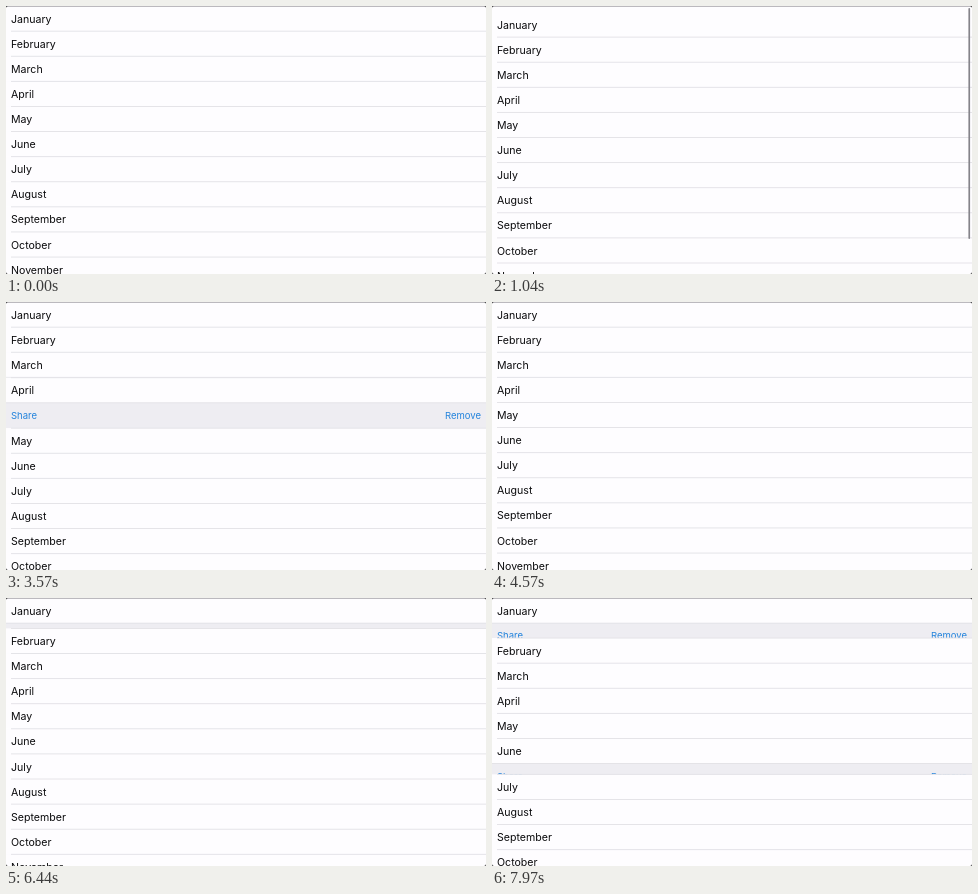
These frames come from a looping animation (480 px wide and 268 px high, 8 s). An HTML page:

```html
<!DOCTYPE html>
<html lang="en">
<head>
<meta charset="utf-8">
<title>Expandable list</title>
<style>
  html, body { margin: 0; width: 100%; height: 100%; overflow: hidden; background: #fefdff; }
  svg { display: block; width: 480px; height: 268px; }
  text { font: 10.6px Inter, sans-serif; fill: #0b0b0d; }
  .action { font-size: 9.5px; fill: #2383dc; }
  .end { text-anchor: end; }
  .paper { fill: #fefdff; }
  .drawer { fill: #eeedf2; }
  .line { fill: #e2e1e6; }
</style>
</head>
<body>
<svg id="stage" viewBox="0 0 480 268">
  <g id="list"></g>
  <rect id="bar" x="476.4" y="2" width="1.7" rx="0.85" fill="#85848a"/>
  <rect width="480" height="0.8" fill="#aaa9ae"/>
  <path d="M0 0H2Q0 0 0 2ZM480 0H478Q480 0 480 2ZM0 268V266Q0 268 2 268ZM480 268V266Q480 268 478 268Z" fill="#222"/>
</svg>
<script>
const LOOP = 8000, PITCH = 25.1, DRAWER = 25.7, MOVE = 300;
const months = ['January', 'February', 'March', 'April', 'May', 'June', 'July',
  'August', 'September', 'October', 'November', 'December'];

// [start time, row index, open or close]
const moves = [
  [1995, 1, 1],
  [2745, 1, 0], [2745, 3, 1],
  [3545, 3, 0], [3545, 2, 1],
  [4255, 2, 0],
  [4940, 2, 1], [5460, 2, 0],
  [6347, 0, 1],
  [6945, 0, 0], [6945, 5, 1],
  [7807, 5, 0], [7807, 0, 1],
];

const clamp = x => Math.max(0, Math.min(1, x));

// cubic-bezier(.42, 0, .58, 1), solved by bisection
function easeInOut(x) {
  let lo = 0, hi = 1;
  for (let i = 0; i < 20; i++) {
    const s = (lo + hi) / 2, r = 1 - s;
    if (3 * r * r * s * 0.42 + 3 * r * s * s * 0.58 + s ** 3 < x) lo = s; else hi = s;
  }
  return lo * lo * (3 - 2 * lo);
}

function openness(row, t) {
  let value = 0;
  for (const [start, index, target] of moves) {
    if (index === row && t > start) {
      value += (target - value) * easeInOut(clamp((t - start) / MOVE));
    }
  }
  return value;
}

// Pull down, then a critically damped return
function overscroll(t) {
  if (t < 470 || t > 1500) return 0;
  if (t < 880) return 19.5 * (1 - Math.cos(Math.PI * (t - 470) / 410)) / 2;
  const k = (t - 880) * 0.015;
  return 19.5 * (1 + k) * Math.exp(-k);
}

const list = document.getElementById('list');
const bar = document.getElementById('bar');

const rows = months.map((name, i) => {
  const row = document.createElementNS('http://www.w3.org/2000/svg', 'g');
  row.innerHTML = `
    <rect class="paper" width="480" height="${PITCH + 0.4}"/>
    ${i ? '<rect class="line" x="5" y="-0.4" width="475" height="0.9"/>' : ''}
    <text x="5" y="16.7">${name}</text>
    <g transform="translate(0 ${PITCH})">
      <rect class="drawer" width="480" height="${DRAWER}"/>
      <rect class="line" y="-0.4" width="480" height="0.9"/>
      <text class="action" x="5" y="16.3">Share</text>
      <text class="action end" x="475" y="16.3">Remove</text>
    </g>`;
  list.append(row);
  return { row, drawer: row.lastElementChild };
});

function draw(t) {
  const pull = overscroll(t);
  let y = pull;
  rows.forEach(({ row, drawer }, i) => {
    const open = openness(i, t);
    row.setAttribute('transform', `translate(0 ${y.toFixed(2)})`);
    drawer.setAttribute('visibility', open > 0.005 ? 'visible' : 'hidden');
    y += PITCH + DRAWER * open;
  });
  bar.setAttribute('height', 236 - pull * 0.85);
  bar.setAttribute('opacity', clamp((t - 480) / 60) * clamp((1640 - t) / 220));
}

function tick() {
  draw(performance.now() % LOOP);
  requestAnimationFrame(tick);
}
tick();
</script>
</body>
</html>
```
